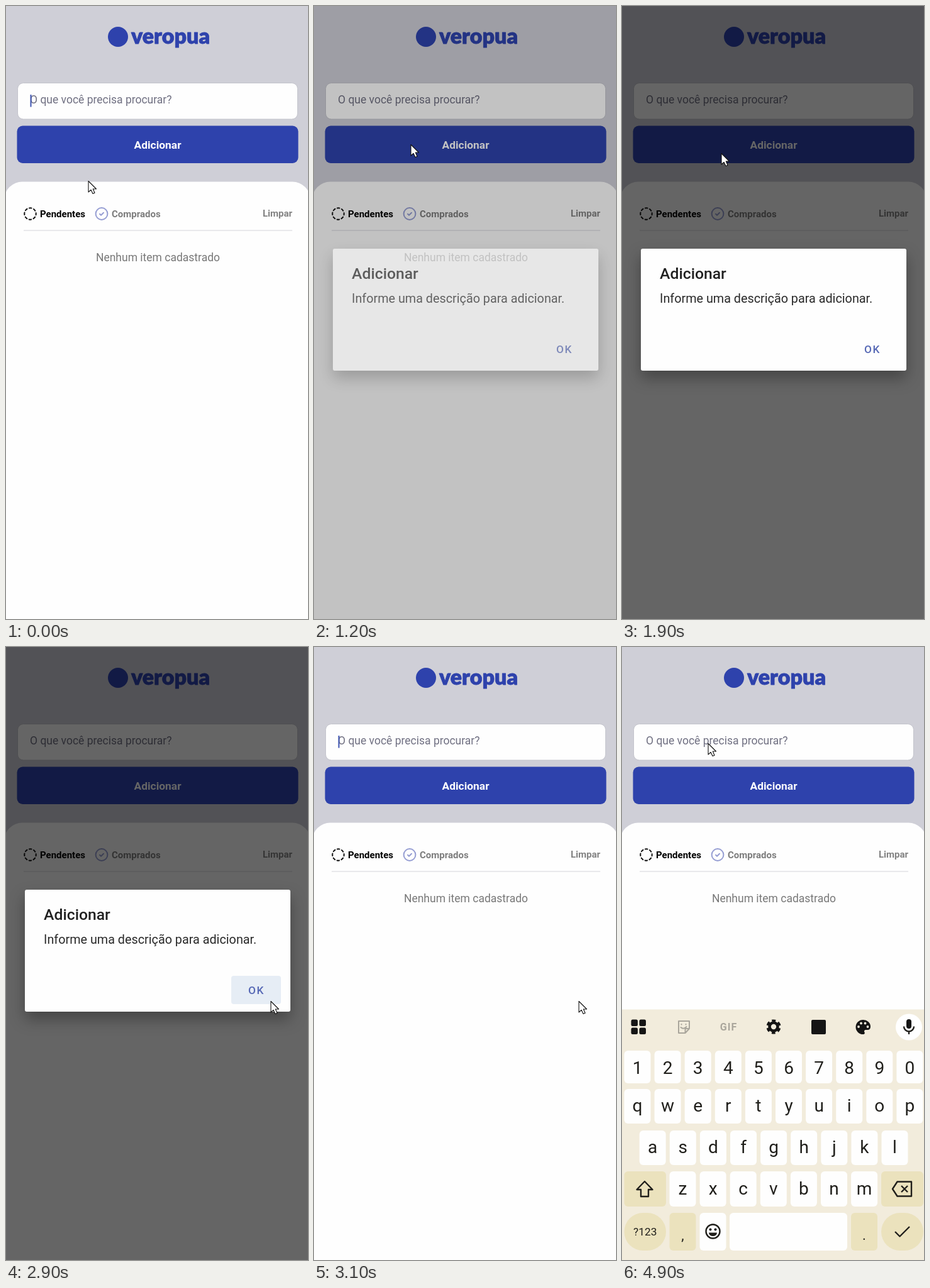
These frames come from a looping animation (480 px wide and 975 px high, 5000 ms). An HTML page:

```html
<!DOCTYPE html>
<html lang="pt-BR">
<head>
<meta charset="utf-8">
<title>Lista</title>
<style>
html, body { margin: 0; width: 100%; height: 100%; overflow: hidden; background: #fefefe; }
svg { display: block; width: 100vw; height: 100vh; font-family: Roboto, sans-serif; }
.mid { text-anchor: middle; }
.tab { font-size: 15px; font-weight: 600; }
.line { fill: none; stroke-width: 2; stroke-linecap: round; stroke-linejoin: round; }
.ink { fill: none; stroke: #201f1b; stroke-width: 2.4; stroke-linejoin: round; }
#card { filter: drop-shadow(0 12px 12px rgba(0, 0, 0, .32)); }
</style>
</head>
<body>
<svg viewBox="0 0 480 975">
  <rect width="480" height="975" fill="#cfcfd7"/>
  <circle cx="178" cy="49" r="16" fill="#2e42ac"/>
  <text x="199" y="60" font-family="Lato, sans-serif" font-size="34" font-weight="900" fill="#2e42ac"
    stroke="#2e42ac" stroke-width=".8" stroke-linejoin="round">veropua</text>

  <rect x="18.5" y="122.5" width="445" height="57.5" rx="9" fill="#fefefe" stroke="#c2c3cb"/>
  <text x="38" y="155" font-size="17.5" fill="#707082">O que você precisa procurar?</text>
  <rect id="caret" x="38.5" y="141" width="2" height="19.5" fill="#3f55b2"/>
  <rect x="17.5" y="190.5" width="447" height="59.5" rx="9" fill="#2e42ac"/>
  <text class="mid" x="241" y="227" font-size="17.4" font-weight="600" fill="#fff">Adicionar</text>

  <rect x="-3" y="279.5" width="487" height="740" rx="29" fill="#fefefe"/>
  <circle class="line" cx="38.5" cy="330.5" r="9.2" stroke="#111" stroke-dasharray="3.6 3.625" stroke-dashoffset="1.8"/>
  <text class="tab" x="54" y="336">Pendentes</text>
  <g class="line" stroke="#969ed3">
    <circle cx="152" cy="330.5" r="9.4"/>
    <path d="M149 330.7l2 2 4-4"/>
  </g>
  <text class="tab" x="168" y="336" fill="#7d7d7d">Comprados</text>
  <text class="tab" x="455" y="335" text-anchor="end" fill="#828282">Limpar</text>
  <rect x="28" y="356" width="427" height="2" fill="#e9e9ec"/>
  <text class="mid" x="241.5" y="406" font-size="17.5" fill="#787878">Nenhum item cadastrado</text>

  <rect id="dim" width="480" height="975"/>
  <g id="dialog">
    <rect id="card" x="30" y="386" width="422" height="194" rx="3" fill="#fefefe"/>
    <text x="60" y="434" font-size="24.7" font-weight="500" fill="#212121">Adicionar</text>
    <text x="60" y="472" font-size="19.8" fill="#2a2a2a">Informe uma descrição para adicionar.</text>
    <rect id="press" x="358" y="523" width="79" height="45" rx="4" fill="#e6edf5"/>
    <text x="385" y="552" font-size="17.3" font-weight="500" letter-spacing="1.5" fill="#5668b5">OK</text>
  </g>

  <g id="keyboard">
    <rect y="576.5" width="480" height="399" fill="#f2ecdc"/>
    <g id="keys" class="mid" fill="#201f1b"></g>
    <g fill="#151515">
      <rect x="14.5" y="592.5" width="10.5" height="10.5" rx="2.5"/>
      <rect x="27.5" y="592.5" width="10.5" height="10.5" rx="2.5"/>
      <rect x="14.5" y="605.5" width="10.5" height="10.5" rx="2.5"/>
      <rect x="27.5" y="605.5" width="10.5" height="10.5" rx="2.5"/>
      <rect x="301" y="593" width="23" height="23" rx="2"/>
      <path d="M383 593a11.5 11.5 0 0 0 0 23c3 0 3.3-2 2.3-3.5s0-3.5 2-3.5h3c3 0 4.7-2 4.7-5a11.5 11 0 0 0-12-11Z"/>
    </g>
    <g fill="#f2ecdc">
      <circle cx="376" cy="604" r="1.9"/><circle cx="380" cy="598.5" r="1.9"/>
      <circle cx="386.5" cy="598.5" r="1.9"/><circle cx="390.5" cy="604" r="1.9"/>
    </g>
    <g fill="none" stroke="#151515" transform="translate(241 604) rotate(90)">
      <circle r="6.5" stroke-width="4.6"/>
      <circle r="9.6" stroke-width="4" stroke-dasharray="5.8 4.253" stroke-dashoffset="2.9"/>
    </g>
    <g class="line" stroke="#aaa69c">
      <path d="M90 595h17v12l-6.5 7H90Zm17 12h-6.5v7"/>
      <path d="M94.5 600v.5m7-.5v.5m-8 4.5q4.5 4 9-1"/>
    </g>
    <text class="mid" x="169.5" y="610" font-size="16" font-weight="700" letter-spacing="1" fill="#aaa69c">GIF</text>
    <circle cx="456" cy="604.5" r="21" fill="#fff"/>
    <rect x="452" y="592" width="8" height="15" rx="4" fill="#151515"/>
    <path class="ink" d="M448 603.5a8 8 0 0 0 16 0M456 611.5v4.5"/>
    <path class="ink" d="M36 850L23.5 863H30v11h12V863h6.5Z"/>
    <path class="ink" d="M437.5 850.5H460v23H437.5L430 862Zm6.5 6.5l10 10m0-10l-10 10"/>
    <path class="ink" d="M434 930l7.5 7.5L457 922"/>
    <circle class="ink" cx="144.5" cy="929.5" r="11"/>
    <circle cx="140.5" cy="926.5" r="1.9"/><circle cx="148.5" cy="926.5" r="1.9"/>
    <path d="M138 931.5h13a6.5 5.5 0 0 1-13 0Z" fill="#201f1b"/>
  </g>

  <path id="cursor" d="M0 .5V18L4 14.3L7 20.5L10 19.2L7.3 13H12.5Z" fill="#fff" stroke="#111"
    stroke-width="1.1" stroke-linejoin="round"/>
</svg>
<script>
const LOOP = 5000, STEP = 100;
const $ = id => document.getElementById(id);
const clamp = v => Math.max(0, Math.min(1, v));
const ramp = (t, from, to) => clamp((t - from) / (to - from));
const smooth = u => u * u * (3 - 2 * u);

const WHITE = '#fefefe', SAND = '#ebe2bd';
let keys = '';
function key(x, y, w, h, label = '', base = 0, fill = WHITE, r = 6, size = 28) {
  keys += `<rect x="${x}" y="${y}" width="${w}" height="${h}" rx="${r}" fill="${fill}"/>` +
    `<text x="${x + w / 2}" y="${base}" font-size="${size}">${label}</text>`;
}
function row(chars, x, y, h, base) {
  [...chars].forEach((c, i) => key(x + i * 48.1, y, 42, h, c, base));
}
row('1234567890', 3.5, 642, 52, 679);
row('qwertyuiop', 3.5, 703, 55, 739);
row('asdfghjkl', 27.7, 769, 55, 805);
row('zxcvbnm', 75.5, 834, 56, 871);
key(3.5, 834, 66.5, 56, '', 0, SAND);
key(412, 834, 67, 56, '', 0, SAND);
key(3.5, 900, 66.5, 60, '?123', 936, SAND, 30, 17.3);
key(75.5, 900, 42, 60, ',', 943, SAND, 6, 22);
key(123.5, 900, 42, 60);
key(171, 900, 187, 60);
key(364, 900, 42, 60, '.', 943, SAND, 6, 22);
key(412, 900, 67, 60, '', 0, SAND, 30);
$('keys').innerHTML = keys;

// Pointer stops: time, x, y
const stops = [
  [0, 131, 278], [600, 150, 222], [900, 154, 220], [1700, 154, 220], [1900, 158, 234],
  [2300, 432, 567], [2500, 421, 563], [3150, 421, 563], [3750, 137, 153], [LOOP, 137, 153]
];
function pointer(t) {
  const i = stops.findIndex(s => s[0] > t);
  const [t0, x0, y0] = stops[i - 1], [t1, x1, y1] = stops[i];
  const u = smooth(ramp(t, t0, t1));
  return [x0 + (x1 - x0) * u, y0 + (y1 - y0) * u];
}

function draw(t) {
  const open = 1 - ramp(t, 2950, 3080);
  $('dim').setAttribute('opacity', 0.6 * ramp(t, 1110, 1340) * open);
  $('dialog').setAttribute('opacity', ramp(t, 1110, 1253) * open);
  $('press').setAttribute('opacity', ramp(t, 2600, 2800));

  const caret = t < 600 || (t >= 3000 && t % 1000 < 500);
  $('caret').setAttribute('opacity', caret ? 1 : 0);

  const hidden = (1 - ramp(t, 4600, 4900)) ** 3;
  $('keyboard').setAttribute('transform', `translate(0 ${hidden * 400})`);
  $('cursor').setAttribute('transform', `translate(${pointer(t)})`);
}

const start = performance.now();
function tick() {
  const t = (performance.now() - start) % LOOP;
  draw(Math.floor(t / STEP) * STEP);
  requestAnimationFrame(tick);
}
tick();
</script>
</body>
</html>
```
